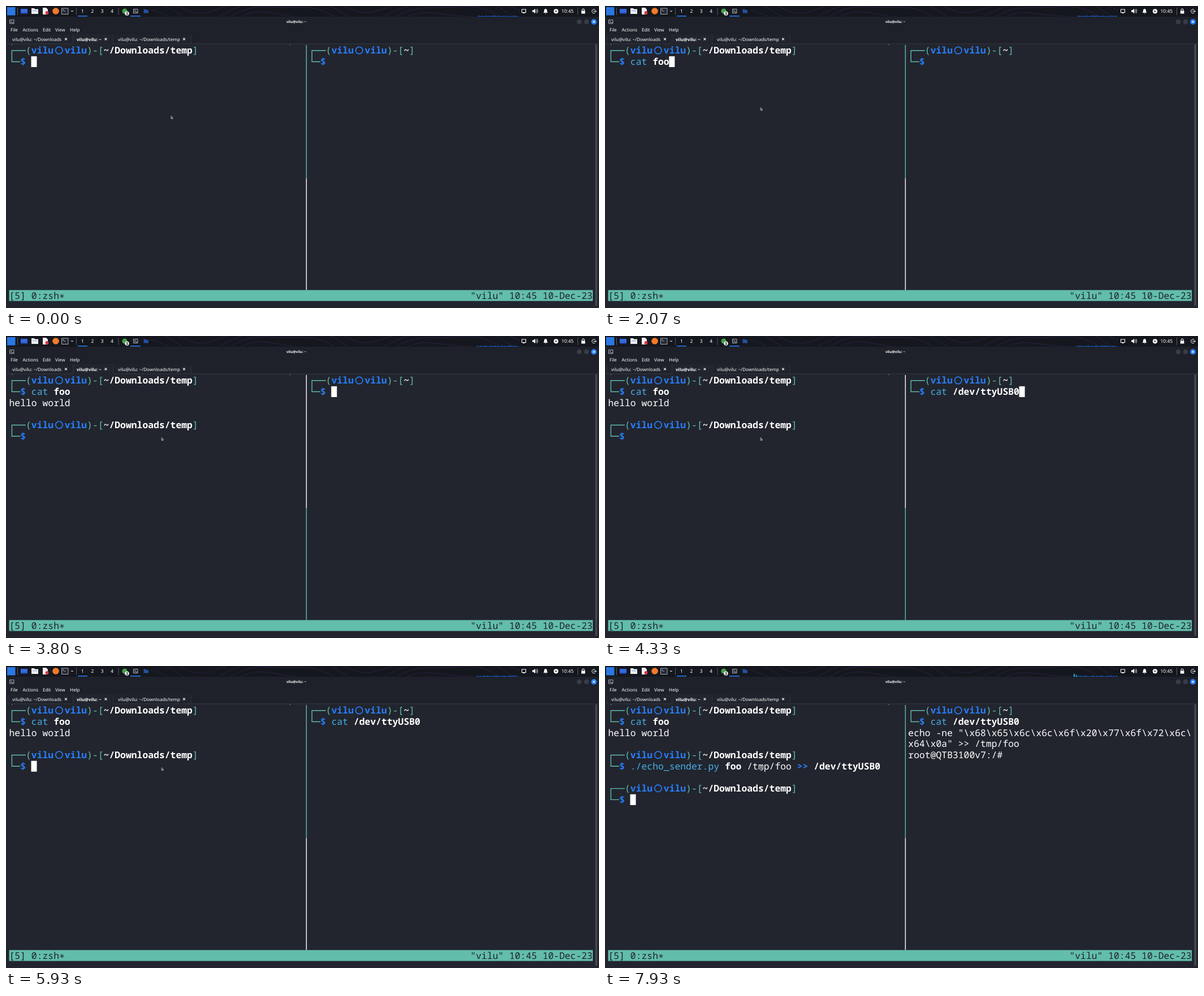
Recreate the animation shown at these times as an HTML page with a canvas. Size 1049 by 534 pixels, loop 8 s.

```html
<!DOCTYPE html>
<html>
<head>
<meta charset="utf-8">
<style>
html, body { margin: 0; width: 100%; height: 100%; overflow: hidden; background: #22252e; }
canvas { display: block; width: 1049px; height: 534px; }
</style>
</head>
<body>
<canvas id="stage"></canvas>
<script>
const WIDTH = 1049, HEIGHT = 534, LOOP = 8000;
const CELL = 9.83, ROW = 19.7, LEFT = 5.5, TOP = 68.9, RIGHT_PANE = 54;
const GREEN = '#62bdab', BLUE = '#277fff', CYAN = '#49aee6', WHITE = '#fff', BG = '#22252e', CHROME = '#1e2129';
const USER = 'vilu';
const MONO = '"Noto Sans Mono", "DejaVu Sans Mono", monospace';
const SANS = '"Noto Sans", "Open Sans", sans-serif';

const canvas = document.getElementById('stage');
const ctx = canvas.getContext('2d');
const dpr = window.devicePixelRatio || 1;
canvas.width = WIDTH * dpr;
canvas.height = HEIGHT * dpr;
ctx.scale(dpr, dpr);
ctx.textRendering = 'geometricPrecision';

function box(x, y, w, h, color) {
  ctx.fillStyle = color;
  ctx.fillRect(x, y, w, h);
}

function disc(x, y, r, color) {
  ctx.fillStyle = color;
  ctx.beginPath();
  ctx.arc(x, y, r, 0, 7);
  ctx.fill();
}

function path(d, color, width = 1, fill) {
  const p = new Path2D(d);
  if (fill) { ctx.fillStyle = fill; ctx.fill(p); }
  if (color) { ctx.strokeStyle = color; ctx.lineWidth = width; ctx.stroke(p); }
}

function label(text, x, y, size = 8, weight = 400, align = 'left', color = WHITE) {
  ctx.font = `${weight} ${size}px ${SANS}`;
  ctx.textAlign = align;
  ctx.fillStyle = color;
  ctx.fillText(text, x, y);
}

const cross = (x, y, r) => path(`M${x - r} ${y - r}l${2 * r} ${2 * r}M${x - r} ${y + r}l${2 * r} ${-2 * r}`, WHITE, 1.1);
const hash = n => { const s = Math.sin(n * 127.1) * 43758.5; return s - Math.floor(s); };
const colX = col => LEFT + col * CELL;
const rowY = row => TOP + row * ROW;

function put(col, row, text, color = WHITE, bold = false) {
  ctx.font = `${bold ? 700 : 400} ${CELL / 0.6}px ${MONO}`;
  ctx.textAlign = 'left';
  ctx.fillStyle = color;
  [...text].forEach((ch, i) => ctx.fillText(ch, colX(col + i), rowY(row) + 15.3));
  return col + text.length;
}

function prompt(pane, row, dir) {
  const x = colX(pane), y = rowY(row) + ROW / 2;
  path(`M${x + 3 * CELL} ${y}H${x + CELL / 2}V${y + ROW}H${x + 2 * CELL}`, GREEN, 1.4);
  put(pane + 3, row, '(', GREEN);
  put(pane + 4, row, USER, BLUE, true);
  ctx.strokeStyle = BLUE;
  ctx.lineWidth = 1.6;
  ctx.beginPath();
  ctx.arc(x + 9 * CELL, y - 0.3, 6.2, 0, 7);
  ctx.stroke();
  put(pane + 10, row, USER, BLUE, true);
  put(pane + 14, row, ')-[', GREEN);
  put(put(pane + 17, row, dir, WHITE, true), row, ']', GREEN);
  put(pane + 2, row + 1, '$', BLUE, true);
}

// Each part is [text, color, bold]; parts are separated by one blank cell.
function command(col, row, parts) {
  for (const part of parts) col = put(col, row, ...part) + 1;
}

const cursor = (col, row) => box(colX(col) - 0.3, rowY(row) + 0.3, CELL + 0.2, ROW - 0.6, WHITE);

function terminalIcon(x, y, w, h) {
  path(`M${x} ${y}h${w}v${h}h${-w}z`, '#b9bcc4', 0.9, '#252832');
  path(`M${x + 2} ${y + 2}l1.5 1.3l-1.5 1.3M${x + 4.2} ${y + 5}h2`, WHITE, 0.8);
}

function folder(x, y, w, h, color) {
  path(`M${x} ${y}h${w * 0.4}l1.5 1.5H${x + w}V${y + h}H${x}z`, null, 0, color);
}

function wallpaper() {
  ctx.save();
  ctx.beginPath();
  ctx.rect(256, 0, 652, 18.5);
  ctx.clip();
  for (let k = 0; k < 6; k++) {
    let d = '';
    for (let x = 256; x <= 910; x += 6) {
      const y = 9 + (k - 2.5) * 13 + 19 * Math.sin(x / 47 + k * 0.2) + 6 * Math.sin(x / 23 - k * 0.3);
      d += (d ? 'L' : 'M') + x + ' ' + y.toFixed(1);
    }
    path(d, '#2b2348', 0.9);
  }
  ctx.restore();
}

function loadGraph(t) {
  const tick = Math.floor(t / 266.7);
  const start = t >= 7870 ? 829 : 829 + Math.floor(hash(tick + 3) * 8);
  for (let x = start; x < 906; x += 2) {
    const h = 1 + Math.floor(hash(x / 2 - tick) * 2);
    box(x, 19 - h, 1.6, h, '#1457bd');
  }
  if (t >= 7870) {
    box(829, 14, 2, 5, '#20b6e8');
    box(833, 15.5, 1.5, 3.5, '#20b6e8');
  }
}

function panel(t) {
  box(0, 0, WIDTH, 19, '#15171e');
  wallpaper();
  loadGraph(t);
  box(2, 2, 14.5, 14.5, '#2b78e4');
  for (const x of [20, 124, 198.5, 1011]) box(x, 3, 1, 13, '#555964');
  box(26, 5, 12, 9, '#3569df');
  box(26, 12, 12, 2, '#1d3f96');
  folder(45, 4, 12, 10, '#eef0f4');
  box(47, 8, 8, 1, '#7e9be0');
  path('M65 3h6l3 3v9h-9z', null, 0, '#f2f2f4');
  disc(72.5, 12, 2.9, '#d9343c');
  disc(88, 9, 5.8, '#f47b2a');
  terminalIcon(98.5, 4, 11.5, 10.5);
  path('M115 8l2 2l2-2', WHITE, 1);
  ['1', '2', '3', '4'].forEach((n, i) => label(n, 135.5 + i * 17.4, 12.2, 8.5, 400, 'center'));
  box(127, 17, 17, 1.5, BLUE);
  disc(210, 9, 4.6, '#43a047');
  disc(214, 13.3, 3.7, WHITE);
  label('3', 214, 15.8, 7, 700, 'center', '#111');
  terminalIcon(225.5, 5.5, 7.5, 7);
  box(220, 17, 18, 1.5, BLUE);
  folder(243.5, 5.5, 8.5, 7, '#23519f');

  path('M912.5 6h7v5.5h-7zM914.5 12.5h3', WHITE, 1.1);
  path('M931 7.5h2l3-2.7v8.4l-3-2.7h-2z', null, 0, WHITE);
  path('M937.2 6.5q2 2.5 0 5M939 5q3.2 4 0 8', WHITE, 0.9);
  path('M950.5 12q1.5-1 1.5-4q.3-3 2.5-3t2.5 3q0 3 1.5 4zM953.3 13h2.4l-1.2 1z', null, 0, WHITE);
  disc(973, 9.3, 4.1, WHITE);
  path('M972 7.3v4l2.4-2z', null, 0, '#15171e');
  label('10:45', 982.5, 12.2, 8.5);
  box(1017.8, 8.5, 6.6, 5, WHITE);
  path('M1019.2 9V7q0-2 1.9-2t1.9 2v2', WHITE, 1.1);
  path('M1042 6.4a3.5 3.5 0 1 0 0 5.8M1039 9.3h5M1042.5 7.5l1.8 1.8l-1.8 1.8', WHITE, 1);
}

function windowChrome() {
  const host = `${USER}@${USER}: ~`;
  box(0, 19, WIDTH, 48, CHROME);
  terminalIcon(6.5, 24.5, 7.5, 6.5);
  label(host, 513.5, 30.2, 6.2, 700, 'center');
  disc(1014, 28, 4.4, '#393c45');
  disc(1027, 28, 4.4, '#393c45');
  disc(1040, 28, 5, BLUE);
  cross(1040, 28, 1.7);
  [['File', 8], ['Actions', 29.5], ['Edit', 65], ['View', 87], ['Help', 113]]
    .forEach(([text, x]) => label(text, x, 45.2));

  box(3, 50, 115, 16.5, '#20232b');
  box(118, 50, 71, 17.5, BG);
  box(189, 50, 138, 16.5, '#20232b');
  for (const x of [3, 118, 189, 327]) box(x, 51, 0.7, 15.5, '#353842');
  box(0, 66.5, 118, 0.8, '#3b3e47');
  box(189, 66.5, WIDTH - 189, 0.8, '#3b3e47');
  label(host + '/Downloads', 11, 61.5);
  label(host, 125, 61.5, 7.7, 700);
  label(host + '/Downloads/temp', 198, 61.5);
  for (const x of [106, 176.5, 315]) cross(x, 58.5, 1.9);
  box(10.2, 67.8, 1.2, 1.2, '#9aa0a8');
  box(501.5, 67.8, 1.2, 1.2, '#9aa0a8');
  box(1042.5, 68, 3.2, 462, '#484b53');
}

function leftPane(t, active) {
  const dir = '~/Downloads/temp';
  let cursorAt = [4, 1];
  prompt(0, 0, dir);
  if (t >= 1730) {
    command(4, 1, [['cat', CYAN], ['foo', WHITE, true]]);
    cursorAt = [11, 1];
  }
  if (t >= 2200) {
    put(0, 2, 'hello world');
    prompt(0, 4, dir);
    cursorAt = [4, 5];
  }
  if (t >= 6730) {
    command(4, 5, [['./echo_sender.py', CYAN], ['foo', WHITE, true], ['/tmp/foo'],
      ['>>', BLUE, true], ['/dev/ttyUSB0', WHITE, true]]);
    cursorAt = t < 7670 ? [49, 5] : [0, 6];
  }
  if (t >= 7800) {
    prompt(0, 7, dir);
    cursorAt = [4, 8];
  }
  if (active) cursor(...cursorAt);
}

function rightPane(t, active) {
  const col = RIGHT_PANE;
  let cursorAt = [col + 4, 1];
  prompt(col, 0, '~');
  if (t >= 4070) {
    command(col + 4, 1, [['cat', CYAN], ['/dev/ttyUSB0', WHITE, true]]);
    cursorAt = t < 4930 ? [col + 20, 1] : [col, 2];
  }
  if (t >= 7800) {
    put(col, 2, String.raw`echo -ne "\x68\x65\x6c\x6c\x6f\x20\x77\x6f\x72\x6c` + '\\');
    put(col, 3, String.raw`x64\x0a" >> /tmp/foo`);
  }
  if (t >= 7870) put(col, 4, 'root@QTB3100v7:/#');
  if (active) cursor(...cursorAt);
}

function terminal(t) {
  const rightActive = t >= 3200 && t < 5800;
  const x = colX(53.5) - 0.7, half = 12 * ROW - 0.8;
  box(x, TOP, 1.4, half, rightActive ? WHITE : GREEN);
  box(x, TOP + half, 1.4, 22 * ROW - half, rightActive ? GREEN : WHITE);
  leftPane(t, !rightActive);
  rightPane(t, rightActive);

  const job = t >= 5670 && t < 5870 ? 'cat' : 'zsh';
  box(LEFT, rowY(22), 105 * CELL + 0.4, ROW - 0.4, GREEN);
  put(0, 22, `[5] 0:${job}\u2217`, '#1f2229');
  put(83, 22, `"${USER}" 10:45 10-Dec-23`, '#1f2229');
}

function pointer(t) {
  const moved = [70, 130, 200, 270, 400].filter(at => t >= at).length / 5;
  const x = 292 - 16.7 * moved, y = 194.6 - 14.8 * moved;
  path(`M${x} ${y}v4.6l1.1-1l.8 1.6l.8-.4l-.7-1.5h1.4z`, '#d9dbe0', 0.8, '#111');
}

function draw(now) {
  const t = now % LOOP;
  box(0, 0, WIDTH, HEIGHT, BG);
  box(0, 67, 1, HEIGHT - 67, CHROME);
  panel(t);
  windowChrome();
  terminal(t);
  pointer(t);
}

const began = performance.now();
function loop() {
  draw(performance.now() - began);
  requestAnimationFrame(loop);
}
loop();
</script>
</body>
</html>
```
